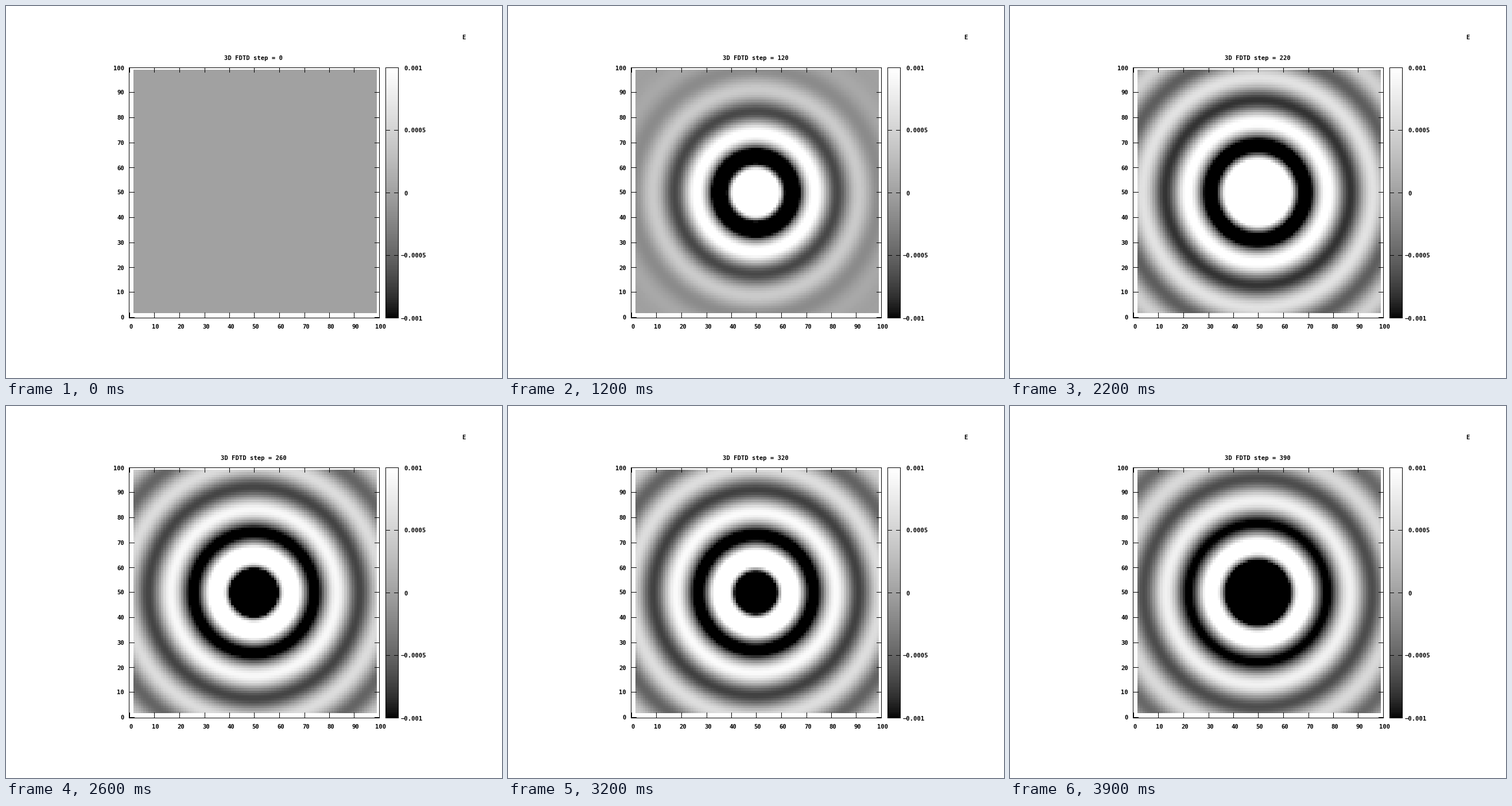
Write a matplotlib script that moves like this. It is 864x648 px and loops after 4000 ms.

```python
import numpy as np
import matplotlib.pyplot as plt
from matplotlib.animation import FuncAnimation

W, H = 864, 648
FRAMES, INTERVAL = 40, 100
STEPS_PER_FRAME = 10

# Stage pixels; whole numbers, since lines snap to pixel centres
LEFT, RIGHT, TOP, BOTTOM = 214, 650, 107, 543
BAR_LEFT, BAR_RIGHT = 661, 683
WAVE_EXTENT = (222.2, 645.8, 534.8, 111.2)
TICK_GAP = 43.5

# Wave: a point dipole driven by a softly switched-on sine
SPEED = 0.572
PERIOD = 31.0
RISE = 54.0
AMPLITUDE = 30.5
OMEGA = 2 * np.pi / PERIOD

DT = 0.1
tau = np.arange(0, 400, DT)
envelope = 1 - np.exp(-(tau / RISE) ** 2)
current = -AMPLITUDE / OMEGA * envelope * np.sin(OMEGA * tau + 0.05)
current_rate = np.gradient(current, DT)
charge = np.cumsum(current) * DT

cells = np.arange(2, 99) + 0.5
gx, gy = np.meshgrid(cells - 50, cells - 50)
radius = np.hypot(gx, gy)


def field(step):
    """Field in the plane through the dipole, in units of 0.001."""
    delayed = step - radius / SPEED
    far, mid, near = (np.interp(delayed, tau, s, left=0)
                      for s in (current_rate, current, charge))
    return (far / radius + SPEED * mid / radius ** 2
            + SPEED ** 2 * near / radius ** 3)


def shade(value):
    """Gray level with a palette gamma of 1.5."""
    return ((np.clip(value, -1, 1) + 1) / 2) ** (1 / 1.5)


fig = plt.figure(figsize=(W / 72, H / 72), dpi=72, facecolor="white")
ax = fig.add_axes([0, 0, 1, 1])


def line(xs, ys):
    ax.plot(xs, ys, color="black", lw=1, antialiased=False, snap=True,
            zorder=3, solid_capstyle="butt", solid_joinstyle="miter")


def box(x0, x1, y0, y1):
    line([x0, x1, x1, x0, x0], [y0, y0, y1, y1, y0])


def label(x, y, text, ha="center"):
    return ax.text(x, y, text, ha=ha, va="center_baseline", color="black",
                   family="DejaVu Sans Mono", weight="bold", size=10.5)


def gray_image(data, extent):
    return ax.imshow(data, cmap="gray", vmin=0, vmax=1, origin="lower",
                     interpolation="nearest", aspect="auto", extent=extent)


wave = gray_image(shade(field(0)), WAVE_EXTENT)
ramp = shade(np.linspace(-1, 1, 128))[:, None]
gray_image(ramp, (BAR_LEFT, BAR_RIGHT, BOTTOM, TOP))

box(LEFT, RIGHT, TOP, BOTTOM)
box(BAR_LEFT, BAR_RIGHT, TOP, BOTTOM)

for i in range(11):
    x = round(LEFT + 1 + i * TICK_GAP)
    y = round(BOTTOM - 1 - i * TICK_GAP)
    line([x, x], [BOTTOM, BOTTOM - 9])
    line([x, x], [TOP, TOP + 8])
    line([LEFT, LEFT + 9], [y, y])
    line([RIGHT, RIGHT - 8], [y, y])
    label(x + 2.5, 558.5, str(10 * i))
    label(206, y + 0.5, str(10 * i), "right")

for i, text in enumerate(["\u22120.001", "\u22120.0005", "0", "0.0005",
                          "0.001"]):
    y = BOTTOM - i * (BOTTOM - TOP) // 4
    if 0 < i < 4:
        line([BAR_LEFT, BAR_LEFT + 7], [y, y])
        line([BAR_RIGHT, BAR_RIGHT - 7], [y, y])
    label(687.5 if i < 2 else 693.8, y + 0.5, text, "left")

label(797, 54.5, "E")
title = label(431, 90.5, "")

ax.set_xlim(0, W)
ax.set_ylim(H, 0)
ax.axis("off")


def update(frame):
    step = frame * STEPS_PER_FRAME
    wave.set_data(shade(field(step)))
    title.set_text(f"3D FDTD step = {step}")
    return wave, title


anim = FuncAnimation(fig, update, frames=FRAMES, interval=INTERVAL,
                     repeat=True, repeat_delay=0, blit=False)
plt.show()
```
